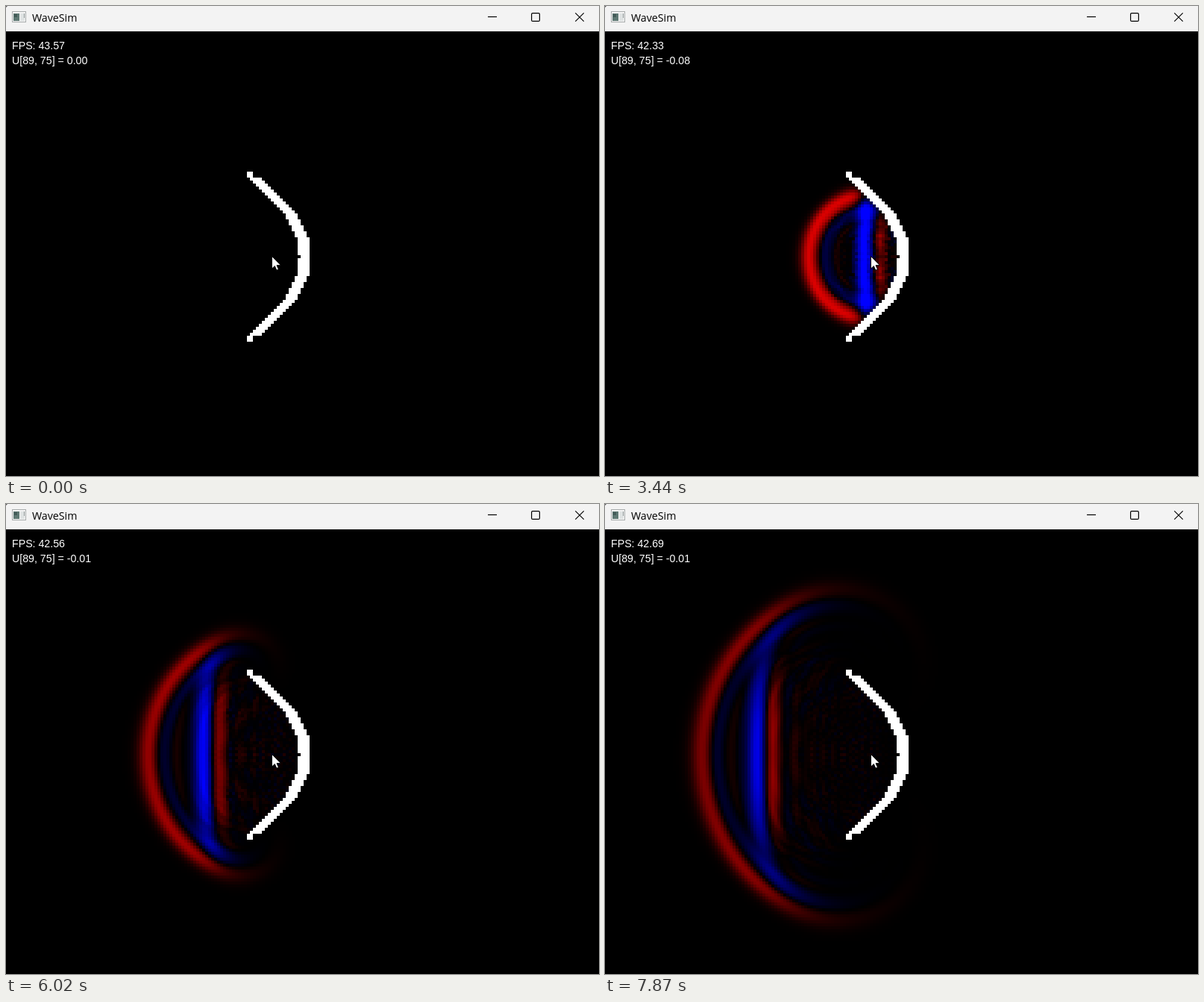
These frames come from a looping animation (795 px wide and 630 px high, 7.94 s). An HTML page with a canvas:

```html
<!DOCTYPE html>
<html lang="en">
<head>
<meta charset="utf-8">
<title>WaveSim</title>
<style>
  html, body { margin: 0; width: 100%; height: 100%; overflow: hidden; background: #000; }
  #stage { position: relative; width: 795px; height: 630px; overflow: hidden; background: #000; }
  canvas { position: absolute; left: -1px; top: 34px; width: 800px; height: 600px; image-rendering: pixelated; }
  svg { position: absolute; left: 0; top: 0; }
  .hud { font: 14.2px "Liberation Sans", Arial, sans-serif; fill: #fff; }
  .title { font: 14.2px "Open Sans", sans-serif; fill: #000; }
</style>
</head>
<body>
<div id="stage">
  <canvas id="field" width="200" height="150"></canvas>
  <svg width="795" height="630" viewBox="0 0 795 630">
    <rect width="795" height="34" fill="#f3f3f3"/>
    <path d="M0 0h2L0 2z" fill="#555"/>
    <rect x="8.5" y="7.5" width="18" height="14" fill="#f4f4f4" stroke="#a9adad"/>
    <rect x="10" y="10" width="8" height="10" fill="#5d7772"/>
    <rect x="11" y="11" width="4" height="4" fill="#435a57"/>
    <rect x="19" y="10" width="6" height="10" fill="#dfe3e3"/>
    <path d="M24.5 10v6" stroke="#8c9494"/>
    <text class="title" x="35" y="21">WaveSim</text>
    <g fill="none" stroke="#000" stroke-width="1.2">
      <path d="M646 14.5h12"/>
      <rect x="704.6" y="9.6" width="10.8" height="10.8" rx="1.5"/>
      <path d="M763.3 9.3l11.4 11.4M774.7 9.3l-11.4 11.4"/>
    </g>
    <text class="hud" id="fps" x="8" y="58"></text>
    <text class="hud" id="probe" x="8" y="78"></text>
    <path d="M356.5 335.5v16.6l3.8-3.6 2.5 5.7 2.6-1.1-2.4-5.5h5.3z" fill="#fff" stroke="#000" stroke-width=".9"/>
  </svg>
</div>
<script>
const W = 200, H = 150, CX = 89, CY = 75;
const LOOP = 7940, START = 920, STEP = 69.5, LAST = 100, SUBSTEPS = 3;
const COURANT = 0.191, AMP = 0.56, SIGMA = 2.4, PUSH = 0.22, GAIN = 2550;

const FPS = [[0, 43.57], [260, 44.05], [1270, 42.66], [2320, 43.08], [3370, 42.33],
  [4340, 42.81], [5390, 42.56], [6500, 42.9], [7600, 42.69]];
const PROBE = [[0, 0], [1, .55], [6, .05], [9, -.06], [12, -.03], [20, -.02], [28, -.12],
  [32, -.2], [36, -.08], [40, .03], [44, .01], [50, -.03], [56, .01], [62, -.01],
  [73, -.01], [80, 0], [87, .01], [94, 0], [100, -.01]];

// Parabolic mirror, four cells thick, with one open cell at its vertex
function makeWall() {
  const wall = new Uint8Array(W * H);
  for (let dy = -28; dy <= 28; dy++) {
    const d = Math.abs(dy), half = Math.ceil(d / 2);
    const left = Math.max(81, Math.min(108 - d, 101 - half, 98));
    const right = d > 26 ? 83 : Math.min(112 - d, 105 - half, 102);
    wall.fill(1, (CY + dy) * W + left, (CY + dy) * W + right);
  }
  wall[CY * W + 98] = 0;
  return wall;
}

// Leapfrog wave equation; walls and borders are held at zero
function simulate(wall) {
  let u = new Float32Array(W * H), prev = new Float32Array(W * H);
  for (let y = -4; y <= 4; y++) {
    for (let x = -4; x <= 4; x++) {
      const r2 = x * x + y * y;
      if (r2 > 20) continue;
      const i = (CY + y) * W + CX + x;
      u[i] = AMP * Math.exp(-r2 / (2 * SIGMA * SIGMA));
      prev[i] = u[i] * (1 - PUSH * COURANT / SIGMA);
    }
  }
  const frames = [new Float32Array(W * H), u.slice()], c2 = COURANT * COURANT;
  while (frames.length <= LAST) {
    for (let s = 0; s < SUBSTEPS; s++) {
      for (let y = 1; y < H - 1; y++) {
        for (let i = y * W + 1, end = i + W - 2; i < end; i++) {
          const lap = u[i - 1] + u[i + 1] + u[i - W] + u[i + W] - 4 * u[i];
          prev[i] = wall[i] ? 0 : 2 * u[i] - prev[i] + c2 * lap;
        }
      }
      [u, prev] = [prev, u];
    }
    frames.push(u.slice());
  }
  return frames;
}

const wall = makeWall(), frames = simulate(wall);
const ctx = document.getElementById("field").getContext("2d");
const image = ctx.createImageData(W, H);
const fpsLabel = document.getElementById("fps"), probeLabel = document.getElementById("probe");

function drawField(u) {
  const px = image.data;
  for (let i = 0, p = 0; i < u.length; i++, p += 4) {
    const v = u[i] * GAIN;
    px[p] = wall[i] ? 255 : v;
    px[p + 1] = wall[i] ? 255 : 0;
    px[p + 2] = wall[i] ? 255 : -v;
    px[p + 3] = 255;
  }
  ctx.putImageData(image, 0, 0);
}

function probeAt(k) {
  const n = Math.max(1, PROBE.findIndex(p => p[0] >= k));
  const [k0, a] = PROBE[n - 1], [k1, b] = PROBE[n];
  return a + (b - a) * (k - k0) / (k1 - k0);
}

let origin = null, shown = -1;
function tick() {
  const now = performance.now();
  if (origin === null) origin = now;
  const t = (now - origin) % LOOP;
  const k = Math.max(0, Math.min(LAST, Math.floor((t - START) / STEP + 1e-6)));
  const fps = FPS.filter(f => f[0] <= t).pop()[1];
  fpsLabel.textContent = "FPS: " + fps.toFixed(2);
  if (k !== shown) {
    shown = k;
    drawField(frames[k]);
    probeLabel.textContent = "U[89, 75] = " + probeAt(k).toFixed(2).replace("-0.00", "0.00");
  }
  requestAnimationFrame(tick);
}
tick();
</script>
</body>
</html>
```
